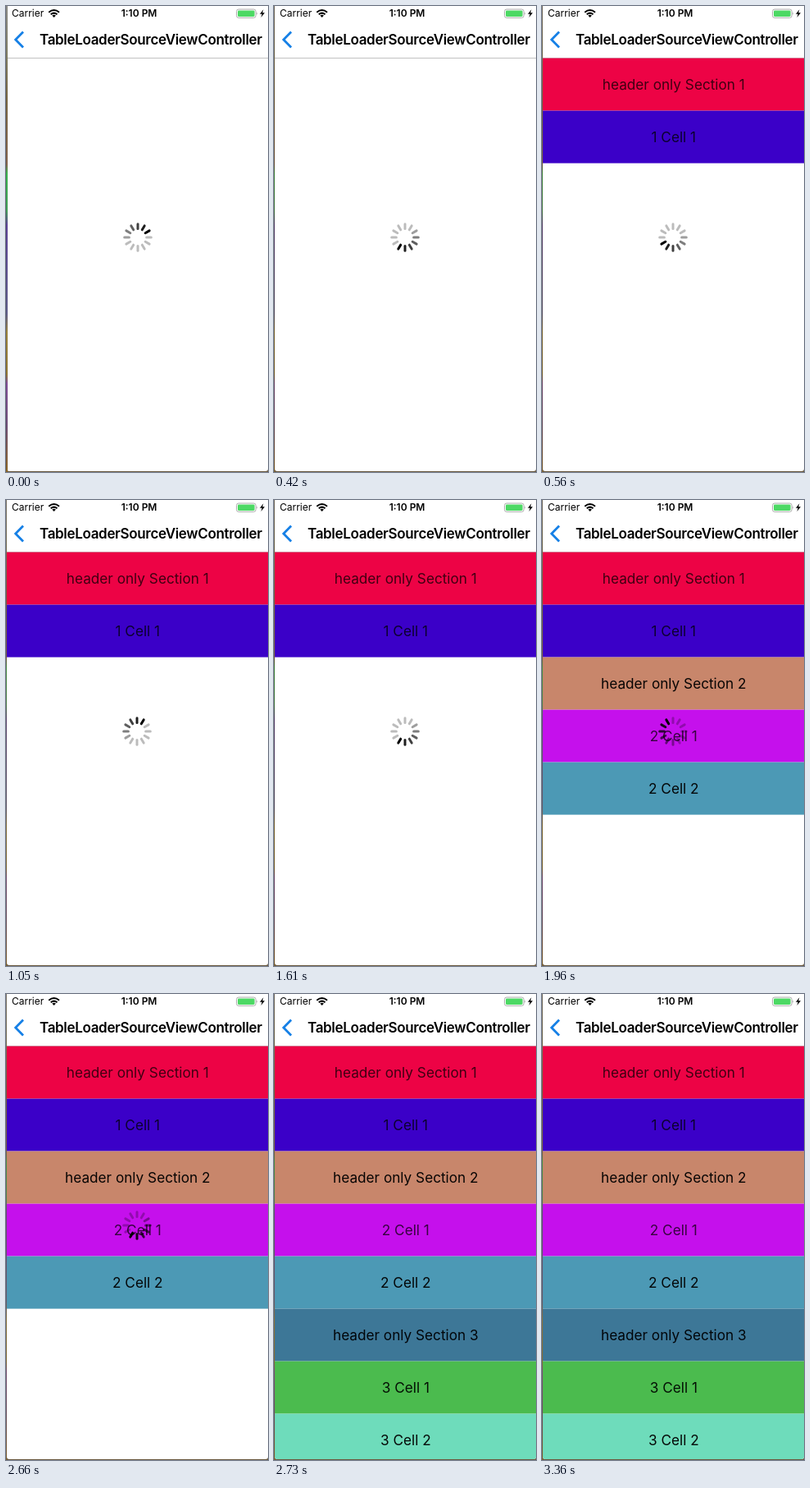
These frames come from a looping animation (320x568 px, 3430 ms). An HTML page:

```html
<!DOCTYPE html>
<html lang="en">
<head>
<meta charset="utf-8">
<title>Table loader</title>
<style>
  html, body { margin: 0; width: 100%; height: 100%; overflow: hidden; background: #fff; }
  svg { display: block; width: 100vw; height: 100vh; font-family: Inter, Roboto, sans-serif; }
  .title { font-size: 17px; font-weight: 600; letter-spacing: -0.33px; }
  .status { font-size: 12px; }
  .clock { font-size: 12px; font-weight: 600; }
  .row { font-size: 17.2px; text-anchor: middle; }
</style>
</head>
<body>
<svg viewBox="0 0 320 568">
  <defs>
    <linearGradient id="backdrop" x1="0" y1="0" x2="0" y2="1">
      <stop offset="0" stop-color="#8a8a86"/>
      <stop offset=".11" stop-color="#7d7a60"/>
      <stop offset=".2" stop-color="#75633f"/>
      <stop offset=".34" stop-color="#80614a"/>
      <stop offset=".36" stop-color="#35b04a"/>
      <stop offset=".44" stop-color="#3f9a55"/>
      <stop offset=".47" stop-color="#5a3f94"/>
      <stop offset=".66" stop-color="#5b5a86"/>
      <stop offset=".7" stop-color="#97803a"/>
      <stop offset=".79" stop-color="#8d7430"/>
      <stop offset=".81" stop-color="#7d4a94"/>
      <stop offset=".9" stop-color="#6a4a74"/>
      <stop offset="1" stop-color="#8a6420"/>
    </linearGradient>
    <clipPath id="window"><path d="M0 0H320V564Q320 567 317 567H4Q1 567 1 564V0Z"/></clipPath>
  </defs>

  <rect width="320" height="568" fill="#6b5a40"/>
  <g clip-path="url(#window)">
    <rect width="320" height="568" fill="#fff"/>
    <rect y="63" width="320" height=".8" fill="#b2b2b2"/>
    <g id="rows"></g>
    <g id="spinner" stroke="#000" stroke-width="3" stroke-linecap="round"></g>
  </g>
  <rect id="edge" width="1" height="568" fill="url(#backdrop)"/>

  <text class="status" x="7" y="13.4">Carrier</text>
  <g fill="none" stroke="#000" stroke-width="2">
    <path d="M52.2 7.7Q58.6 2.3 65 7.7"/>
    <path d="M54.7 10.2Q58.6 7 62.5 10.2"/>
  </g>
  <path d="M56.3 11.5Q58.6 9.8 60.9 11.5L58.6 14Z"/>
  <text class="clock" x="162.6" y="13.4" text-anchor="middle">1:10 PM</text>
  <rect x="281.5" y="4" width="23.6" height="10.4" rx="2.6" fill="#fff" stroke="#a3a3a3" stroke-width=".9"/>
  <rect x="283" y="5.5" width="20.6" height="7.4" rx="1.3" fill="#4cd964"/>
  <path d="M306.2 7.3Q308 9.2 306.2 11.1Z" fill="#a3a3a3"/>
  <path d="M314.4 4.2L310 9.8H312.7L311.4 14L316 8.2H313.2Z"/>
  <path d="M21 31.6L11.7 41L21 50.4" fill="none" stroke="#1680e6" stroke-width="2.8"/>
  <text class="title" x="41" y="47.2">TableLoaderSourceViewController</text>
</svg>
<script>
  const LOOP = 3430, TICK = 70, ROW = 64, TOP = 63.6;
  const rows = [
    ["header only Section 1", "#ed0345", 560, "#400012"],
    ["1 Cell 1", "#3b00c8", 560, "#0c0030"],
    ["header only Section 2", "#c8866b", 1680, "#080504"],
    ["2 Cell 1", "#c510ec", 1680, "#36043f"],
    ["2 Cell 2", "#4c99b5", 1680, "#030607"],
    ["header only Section 3", "#3d7797", 2730, "#02060a"],
    ["3 Cell 1", "#4bbb4e", 2730, "#041004"],
    ["3 Cell 2", "#6edcbb", 2730, "#040806"]
  ];
  const SPIN_END = 2730, SPOKES = 12;
  const $ = id => document.getElementById(id);

  function add(parent, tag, attrs, text = "") {
    const el = document.createElementNS("http://www.w3.org/2000/svg", tag);
    for (const key in attrs) el.setAttribute(key, attrs[key]);
    el.textContent = text;
    return parent.appendChild(el);
  }

  const groups = rows.map(([label, fill, , ink], i) => {
    const g = add($("rows"), "g", {});
    const y = TOP + i * ROW;
    add(g, "rect", { y, width: 320, height: ROW, fill });
    add(g, "text", { class: "row", x: 160.8, y: y + 38.1, fill: ink }, label);
    return g;
  });

  const spokes = Array.from({ length: SPOKES }, (_, i) =>
    add($("spinner"), "line", { y1: -10.6, y2: -16.3, transform: `rotate(${i * 30})` }));

  function draw(now) {
    const t = now % LOOP;
    const tick = Math.floor(t / TICK);

    groups.forEach((g, i) => g.style.display = t >= rows[i][2] ? "" : "none");

    // the pushed screen settles over the first two ticks
    const slide = Math.max(0, 1 - tick / 2);
    $("edge").setAttribute("width", 1 + slide);
    $("edge").setAttribute("opacity", 0.6 + 0.4 * slide);
    $("spinner").setAttribute("transform", `translate(${160 + slide} 282)`);

    // three spoke steps every four ticks
    const head = 2 + Math.floor((3 * tick + 2) / 4);
    spokes.forEach((s, i) => {
      const age = (head - i + SPOKES * 10) % SPOKES;
      s.setAttribute("opacity", Math.max(0.26, 1 - age * 0.125));
    });
    $("spinner").style.display = t < SPIN_END ? "" : "none";
  }

  function loop() {
    draw(performance.now());
    requestAnimationFrame(loop);
  }
  loop();
</script>
</body>
</html>
```
